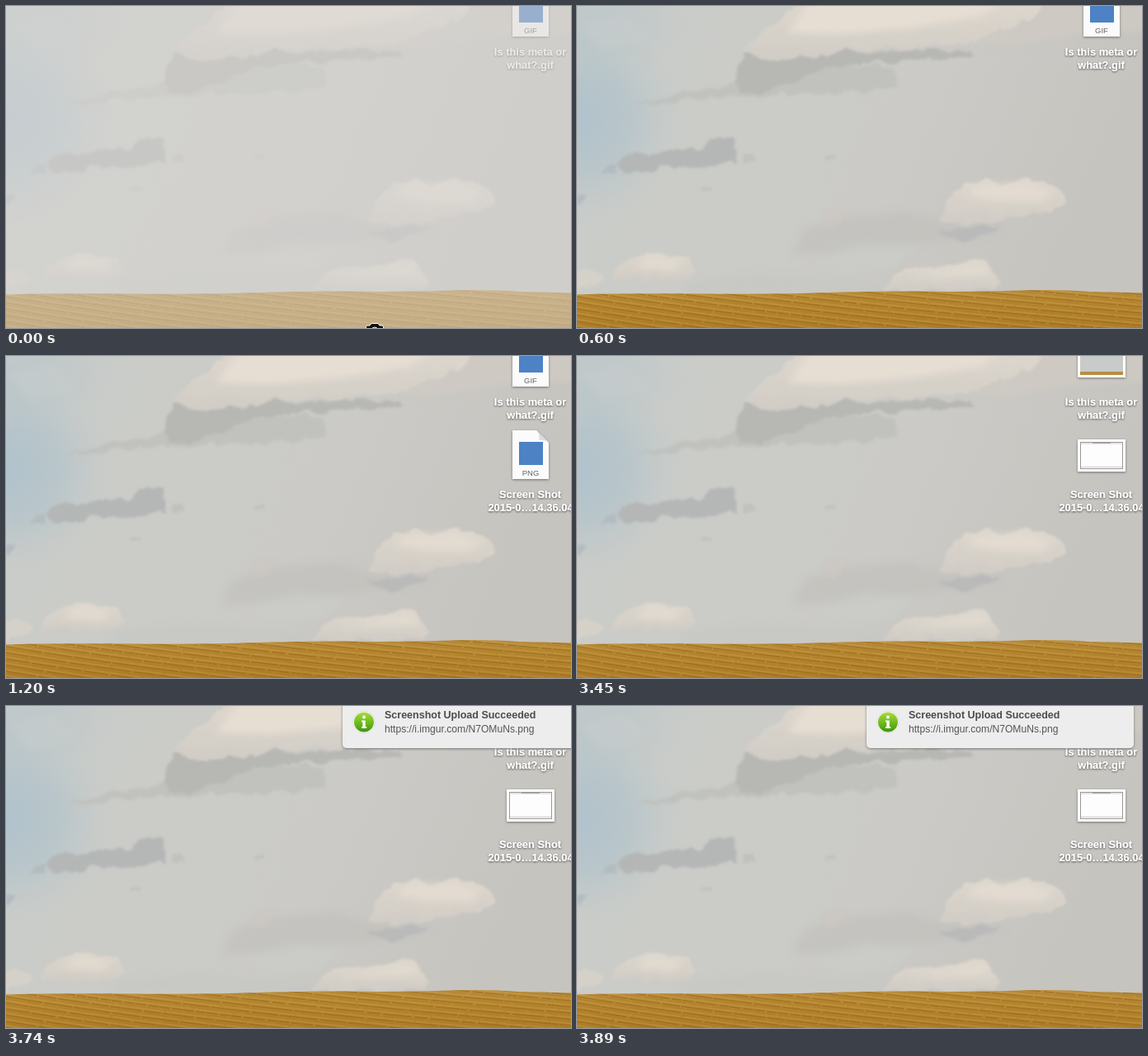
Recreate the animation shown at these times as an HTML page. Size 685 by 390 pixels, loop 7640 ms.

```html
<!DOCTYPE html>
<html lang="en">
<head>
<meta charset="utf-8">
<title>Desktop screenshot upload</title>
<style>
html, body { margin: 0; width: 100%; height: 100%; overflow: hidden; background: #cbcbc7; }
svg { display: block; width: 100vw; height: 100vh; }
text { font-family: "Liberation Sans", Arial, sans-serif; }
.label text { font-weight: bold; font-size: 12.9px; fill: #fff; text-anchor: middle; }
.kind { font-size: 9.5px; fill: #666; text-anchor: middle; }
</style>
</head>
<body>
<svg viewBox="0 0 685 390" preserveAspectRatio="xMidYMid meet">
  <defs>
    <linearGradient id="sky" x2="1" y2=".25">
      <stop offset="0" stop-color="#c8ccca"/>
      <stop offset=".3" stop-color="#cbccc8"/>
      <stop offset=".65" stop-color="#cbcac6"/>
      <stop offset="1" stop-color="#c6c4bf"/>
    </linearGradient>
    <radialGradient id="blue">
      <stop offset="0" stop-color="#b0c2cc"/>
      <stop offset=".5" stop-color="#b5c4ca" stop-opacity=".8"/>
      <stop offset="1" stop-color="#c0c9ca" stop-opacity="0"/>
    </radialGradient>
    <linearGradient id="cream" x2="0" y2="1">
      <stop offset="0" stop-color="#ded7cd"/>
      <stop offset="1" stop-color="#d0ccc5"/>
    </linearGradient>
    <linearGradient id="soil" x2="0" y2="1">
      <stop offset="0" stop-color="#bc9140"/>
      <stop offset=".3" stop-color="#b98a33"/>
      <stop offset="1" stop-color="#b07f2a"/>
    </linearGradient>
    <linearGradient id="green" x2="0" y2="1">
      <stop offset="0" stop-color="#a9db3c"/>
      <stop offset=".5" stop-color="#72bd1f"/>
      <stop offset="1" stop-color="#419311"/>
    </linearGradient>
    <filter id="ragged" x="-5%" y="-10%" width="110%" height="120%">
      <feTurbulence type="fractalNoise" baseFrequency=".05" numOctaves="3" seed="4"/>
      <feDisplacementMap in="SourceGraphic" scale="14" xChannelSelector="R" yChannelSelector="G"/>
      <feGaussianBlur stdDeviation="1.6"/>
    </filter>
    <filter id="haze" x="-20%" y="-40%" width="140%" height="180%"><feGaussianBlur stdDeviation="5"/></filter>
    <filter id="glow" x="-10%" y="-30%" width="120%" height="170%">
      <feDropShadow dx="0" dy="1" stdDeviation="1.2" flood-color="#222" flood-opacity=".75"/>
    </filter>
    <filter id="lift" x="-10%" y="-20%" width="120%" height="150%">
      <feDropShadow dx="0" dy="1" stdDeviation="1.4" flood-color="#333" flood-opacity=".55"/>
    </filter>
    <path id="hill" d="M0 349.4 Q80 347.8 150 348.6 T300 347.2 T430 345.8 T530 344.8 T620 346 L685 347.6 V390 H0Z"/>
    <clipPath id="land"><use href="#hill"/></clipPath>
    <g id="page">
      <path d="M614 90 H643 L658 105 V149 H614Z" fill="#fbfbfb" filter="url(#lift)"/>
      <path d="M643 90 Q648 96 646 102 Q653 101 658 105Z" fill="#dcdcdc"/>
      <rect x="622" y="104" width="29" height="28" fill="#4d82c4"/>
    </g>
    <rect id="frame" x="607" y="101" width="58" height="39" fill="#fff" filter="url(#lift)"/>
  </defs>

  <rect width="685" height="390" fill="url(#sky)"/>
  <ellipse cx="0" cy="135" rx="130" ry="130" fill="url(#blue)"/>
  <ellipse cx="10" cy="20" rx="140" ry="70" fill="url(#blue)" opacity=".4"/>
  <g filter="url(#haze)">
    <path d="M470 -10 H690 V30 L600 35 L520 48 L460 42Z" fill="#d0cbc3" opacity=".7"/>
    <path d="M262 300 L275 272 L320 256 L400 250 L440 262 L520 274 L400 290 L330 300Z" fill="#c2c1bc" opacity=".7"/>
    <path d="M285 305 L350 288 L410 292 L385 316 L320 322Z" fill="#cbccc9" opacity=".8"/>
    <path d="M0 20 L60 10 L90 40 L30 55Z" fill="#c6cccb" opacity=".6"/>
    <path d="M130 335 L220 325 L370 335 V347 H130Z" fill="#c5c6c4" opacity=".6"/>
  </g>
  <g filter="url(#ragged)">
    <path d="M72 117 L140 103 L190 95 L300 70 L386 74 L389 98 L340 104 L200 109 L90 120Z" fill="#bfc0bc" opacity=".8"/>
    <path d="M199 62 L214 40 L240 24 L272 -8 H570 L550 14 L520 27 L485 42 L400 52 L330 51 L300 62 L240 67Z" fill="url(#cream)"/>
    <path d="M188 94 L196 66 L203 58 L240 66 L290 62 L325 52 L370 57 L400 52 L478 55 L481 62 L410 66 L330 71 L302 73 L272 89 L225 103 L196 104Z" fill="#b7b7b4"/>
    <path d="M51 190 L62 179 L100 178 L145 172 L163 164 L192 158 L195 190 L165 194 L103 197 L68 204 L54 200Z" fill="#b4b7b6"/>
    <path d="M32 202 L42 191 L50 193 L45 203Z M0 230 L14 228 L10 236 L0 241Z" fill="#b3bbc0"/>
    <path d="M201 179 H217 V189 H201Z M300 181 H312 V187 H300Z M152 220 H161 V225 H152Z" fill="#bfc0be" opacity=".8"/>
    <path d="M294 270 L300 252 L316 245 L328 255 L312 268Z" fill="#cdc7c2" opacity=".6"/>
    <path d="M435 273 L480 267 L516 268 L490 279 L468 284Z" fill="#bababa"/>
    <path d="M437 260 L450 237 L470 214 L496 211 L520 216 L546 208 L575 216 L594 228 L594 239 L575 248 L535 255 L490 264Z" fill="url(#cream)"/>
    <path d="M369 344 L386 325 L402 316 L440 317 L462 309 L496 310 L511 333 L507 345Z" fill="url(#cream)"/>
    <path d="M40 330 L55 311 L75 304 L91 296 L108 302 L136 304 L143 324 L115 333Z" fill="url(#cream)"/>
    <path d="M-5 325 L14 320 L33 324 L25 337 L-5 347Z" fill="#d5d1c9"/>
  </g>
  <g filter="url(#haze)" fill="#e6ded3">
    <path d="M255 32 L285 -8 H520 L490 12 L410 26 L320 34Z"/>
    <path d="M472 230 L485 217 L545 214 L578 226 L560 238 L510 236Z" opacity=".75"/>
    <path d="M400 330 L445 320 L495 314 L500 325Z" opacity=".7"/>
    <path d="M65 318 L92 302 L128 310 L120 320Z" opacity=".7"/>
  </g>
  <use href="#hill" fill="url(#soil)"/>
  <g id="furrows" clip-path="url(#land)" fill="none"></g>

  <g id="gifIcon">
    <use href="#page" y="-112"/>
    <text class="kind" x="636" y="33">GIF</text>
  </g>
  <g id="gifThumb">
    <use href="#frame" y="-114"/>
    <rect x="610" y="-10" width="52" height="33" fill="#c8cbca"/>
    <rect x="610" y="19" width="52" height="4" fill="#b88d42"/>
  </g>
  <g class="label" filter="url(#glow)">
    <text x="635.5" y="60">Is this meta or</text>
    <text x="635.5" y="76">what?.gif</text>
  </g>
  <g id="shot">
    <g id="pngIcon">
      <use href="#page"/>
      <text class="kind" x="636" y="145">PNG</text>
    </g>
    <g id="pngThumb">
      <use href="#frame"/>
      <rect x="610.5" y="104.5" width="51" height="32" fill="#fdfdfd" stroke="#999"/>
      <path d="M611 106 H661 M611 134.5 H661" stroke="#ccc"/>
      <path d="M625 105.5 H647" stroke="#aaa"/>
    </g>
    <g class="label" filter="url(#glow)">
      <text x="635.5" y="172">Screen Shot</text>
      <text x="636" y="188">2015-0…14.36.04</text>
    </g>
  </g>

  <g id="note">
    <rect x="0" y="-12" width="324" height="63" rx="5" fill="#ededed" filter="url(#lift)"/>
    <circle cx="26" cy="19.5" r="13.3" fill="#fff" stroke="#c8c8c8" stroke-width=".6"/>
    <circle cx="26" cy="19.5" r="12" fill="url(#green)"/>
    <circle cx="26" cy="13.5" r="2" fill="#fff"/>
    <path d="M23 17.5 H27.8 V25 H29.2 V27 H23 V25 H24.4 V19.3 H23Z" fill="#fff"/>
    <text x="51" y="15" font-size="12.5" font-weight="bold" fill="#4c4c4c">Screenshot Upload Succeeded</text>
    <text x="51" y="32" font-size="12.1" fill="#555">https://i.imgur.com/N7OMuNs.png</text>
  </g>

  <g id="flash">
    <rect width="685" height="390" fill="#d8d6d4" opacity=".54"/>
    <path d="M436.5 392 V388.5 Q436.5 387 438 387 H441 L443 384.5 H451 L453 387 H456 Q457.5 387 457.5 388.5 V392Z" fill="#111" stroke="#fff"/>
    <path d="M443 392 A4.2 4.2 0 0 1 451 392" fill="none" stroke="#fff"/>
  </g>
</svg>
<script>
const LOOP = 7640;
const $ = id => document.getElementById(id);
const show = (id, on) => { $(id).style.display = on ? "" : "none"; };

let seed = 11;
const rand = () => (seed = seed * 16807 % 2147483647) / 2147483647;

// Furrows fall steeply on the left and flatten out to the right.
function furrow(y, color, width, opacity) {
  const p = document.createElementNS("http://www.w3.org/2000/svg", "path");
  const dash = [0, 1, 2, 3].map(i => i % 2 ? 1 + rand() * 3 : 12 + rand() * 40);
  p.setAttribute("d", `M0 ${y} Q250 ${y + 42} 685 ${y + 80}`);
  p.setAttribute("stroke", color);
  p.setAttribute("stroke-width", width);
  p.setAttribute("stroke-opacity", opacity);
  p.setAttribute("stroke-dasharray", dash.join(" "));
  $("furrows").append(p);
}
for (let y = 262; y < 392; y += 7.5) {
  furrow(y, "#8f6119", 1.7, .5);
  furrow(y + 2.6, "#a06f22", 1.5, .35);
  furrow(y + 5, "#c79b4a", 1.8, .3);
}

// The banner slides in with three hard steps.
const noteX = t => t < 3740 ? 579 : t < 3890 ? 408 : 351;

function render(t) {
  show("flash", t < 600);
  show("shot", t >= 1200);
  show("pngIcon", t < 2250);
  show("pngThumb", t >= 2250);
  show("gifIcon", t < 3450);
  show("gifThumb", t >= 3450);
  show("note", t >= 3590);
  $("note").setAttribute("transform", `translate(${noteX(t)} 0)`);
}

const start = performance.now();
function tick() {
  render((performance.now() - start) % LOOP);
  requestAnimationFrame(tick);
}
tick();
</script>
</body>
</html>
```
